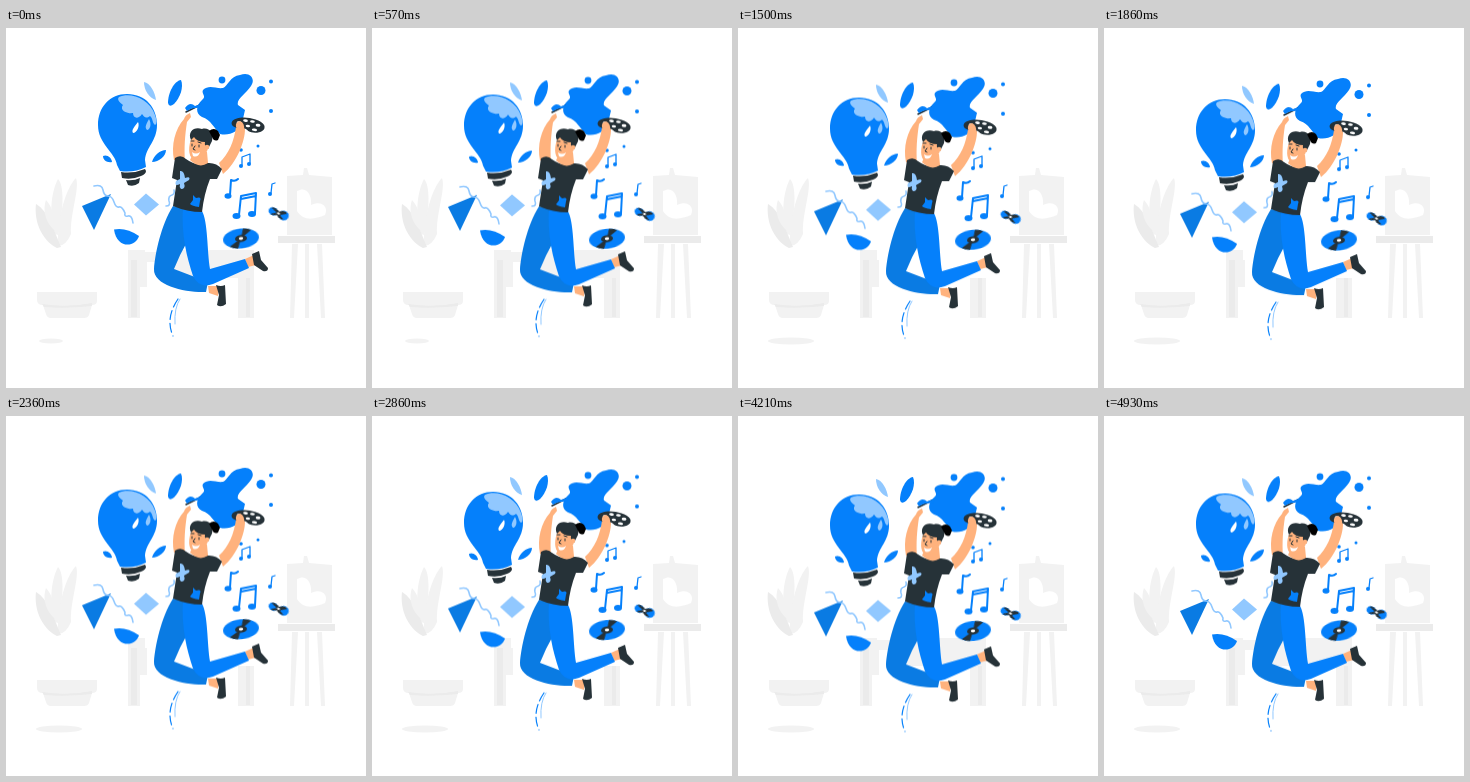
These frames come from a looping animation (360x360 px, 5 s). An HTML page:

```html
<!DOCTYPE html>
<html lang="en">
<head>
<meta charset="utf-8">
<title>Creative jump</title>
<style>
html, body { margin: 0; width: 100%; height: 100%; overflow: hidden; background: #fff; }
svg { display: block; width: 100vw; height: 100vh; }
.b { fill: #0580fb; } .m { fill: #0a7be3; } .l { fill: #91c8ff; } .d { fill: #263238; }
.s { fill: #ffb27d; } .w { fill: #fff; } .g { fill: #f2f2f2; } .h { fill: #ebebeb; }
.line { fill: none; stroke-width: 1.6; stroke-linecap: round; stroke-linejoin: round; }
.lb { stroke: #0580fb; } .ll { stroke: #91c8ff; } .ld { stroke: #263238; }
</style>
</head>
<body>
<svg viewBox="0 0 360 360">
  <g id="room">
    <g class="g">
      <path d="M49 206C42 185 46 162 52 151C58 157 58 180 52 207Z"/>
      <path d="M52 218C51 190 60 160 70 150C74 161 64 185 65 206Q60 218 52 218Z"/>
      <path class="h" d="M51 220C34 211 28 191 30 176C42 183 47 200 55 219Z"/>
      <path d="M47 201C38 192 37 180 40 172C47 180 49 190 49 201Z"/>
      <path d="M31 264H91V273Q91 277 86 277L83 287Q82 290 78 290H45Q41 290 40 286L37 277Q31 277 31 272Z"/>
      <path class="h" d="M36 276Q61 280 86 275V278Q60 281 38 279Z"/>
    </g>
    <ellipse id="shadeShort" class="g" cx="45" cy="313" rx="12" ry="2.5"/>
    <ellipse id="shadeLong" class="g" cx="53" cy="313" rx="23" ry="3.5"/>
    <path id="rail" class="g" d="M139 224H166V234H139ZM168 222H248V250H168Z"/>
    <path class="g" d="M122 222H139V232H141V259H134V290H122ZM232 250H248V290H232Z"/>
    <path class="h" d="M125 232H131V289H125ZM240 250H244V289H240Z"/>
    <path class="g" d="M281 148L297 147L298 140H301L303 147L326 149V207H281Z"/>
    <path class="w" d="M291 163C302 157 306 169 305 177C315 172 323 178 319 187C309 191 298 194 291 183Z"/>
    <path class="h" d="M272 208H329V215H272Z"/>
    <path class="g" d="M286 216H292L288 290H284ZM299 216H303V290H299ZM311 216H316L319 290H315Z"/>
  </g>

  <g data-dy="9.5">
    <path class="b" d="M197 62C203 56 210 61 217 60C222 58 224 48 234 47C244 43 250 51 245 58C240 66 230 71 232 77L239 82L236 95C233 104 223 108 214 106C208 100 205 92 196 89C189 86 190 77 196 72C201 68 195 66 197 62Z"/>
    <g class="b"><circle cx="216" cy="52" r="3.4"/><circle cx="255" cy="62.5" r="4.5"/><circle cx="265" cy="53.5" r="2"/><circle cx="265" cy="83" r="2"/><circle cx="252" cy="118" r="1.5"/><circle cx="235" cy="122" r="1.8"/></g>
  </g>

  <g data-dy="9">
    <path class="b" d="M162 75C162 65 168 53 175 52C178 59 174 70 168 76Q163 80 162 75Z"/>
    <path class="l" d="M138 54C144 55 149 64 150 72C143 70 138 62 138 54Z"/>
  </g>

  <g data-dy="12.5">
    <path class="b" d="M121 66C140 66 151 80 151 97C151 113 140 119 139 132L140 139Q128 145 114 143L111 137C109 124 92 116 92 97C92 79 104 66 121 66Z"/>
    <path class="l" d="M113 69C124 64 143 70 149 87Q152 95 149 97C146 95 147 90 144 88C140 91 138 89 136 86C132 92 127 90 127 85C121 86 113 82 117 77Q110 72 113 69Z"/>
    <path class="w" d="M132 94C134 98 131 105 127 105C125 102 129 98 132 94Z"/>
    <path class="l" d="M143 91C146 96 144 102 141 102C138 99 141 95 143 91Z"/>
    <path class="d" d="M115 144Q127 146 139 141L140 143Q140 146 135 148Q126 152 116 150Z"/>
    <path class="d" d="M120 152Q128 153 134 150L133 155Q128 159 122 157Z"/>
    <path class="b" d="M97 128C101 126 106 130 106 134C101 135 97 132 97 128ZM146 134C148 127 154 122 160 122C160 128 153 134 146 134Z"/>
  </g>

  <g data-dy="18.5">
    <path class="m" d="M105 166L88 202L76 178Z"/>
    <path class="line ll" d="M88 158Q96 156 97 162T102 168T108 174T113 179T119 185Q118 189 122 188T127 195"/>
    <path class="l" d="M140 165.5L153 176.5L140 187.5L128 176.5Z"/>
    <path class="b" d="M108 201.5Q120 199 133 208C130 219 111 222 108 201.5Z"/>
  </g>
  <path class="line ll" data-dy="4" d="M160 178Q165 178 163 173Q162 168 166 167Q169 166 168 162"/>

  <g data-dy="7.5">
    <path class="line lb" style="stroke-width:1.2" stroke-dasharray="9 4" d="M172 271Q159 290 167 308"/>
    <path class="line ll" style="stroke-width:1" d="M174 271Q168 280 169 296"/>
    <g class="line lb">
      <path style="stroke-width:2" d="M233 187L235 168L250 165L249 185M235 171L250 168"/>
      <path style="stroke-width:2" d="M224 167L225 152Q229 154 232 151"/>
      <path d="M236 137V129L244 126V135" style="stroke-width:1.3"/>
      <path d="M265 165L266 156L269 155" style="stroke-width:1.3"/>
    </g>
    <g class="b"><ellipse cx="230.5" cy="188" rx="4" ry="3"/><ellipse cx="246" cy="186" rx="4" ry="3"/><ellipse cx="222" cy="168" rx="3.5" ry="2.8"/><circle cx="235" cy="138" r="2"/><circle cx="243" cy="136" r="2"/><circle cx="264" cy="166" r="2"/></g>
  </g>

  <g data-dy="4.5">
    <g transform="translate(235 210.5) rotate(-6)">
      <ellipse class="b" rx="18" ry="10"/>
      <path class="d" d="M0 0L3 -9.8Q8 -9.5 11 -7.5ZM0 0L-4 9.7Q-9 9 -12 7Z"/>
      <ellipse class="d" rx="6" ry="3.6"/><ellipse class="w" rx="2.2" ry="1.4"/>
    </g>
  </g>
  <g data-dy="12">
    <g transform="translate(272.5 185.5) rotate(22)">
      <ellipse class="b" cx="-5.5" rx="5" ry="4"/>
      <ellipse class="b" cx="5.5" rx="5.2" ry="4.8"/>
      <path class="d" d="M-9 -3Q-5 -5 0 -2Q5 -6 8 -3L2 1L7 4Q2 5 -1 2Q-6 5 -7 3L-2 0Z"/>
      <ellipse class="w" rx="1.6" ry="1"/>
    </g>
  </g>

  <g data-dy="7.4">
    <path class="s" d="M202 258L213 258L212 268L203 265ZM239 231L248 227L250 237L242 239Z"/>
    <path class="d" d="M210 257Q215 259 219 257L220 276Q215 280 211 277L213 267ZM246 226L253 223L255 232L262 240Q262 244 257 243L248 237Z"/>
    <path class="m" d="M167 178L182 181L181 214Q174 226 168 241L202 254L200 264C181 265 147 258 148 241C149 226 155 197 167 178Z"/>
    <path class="b" d="M177 179L196 183C202 194 201 222 204 241L239 231L243 240L207 256Q193 261 187 248C181 230 175 207 177 179Z"/>
    <path class="s" d="M168 132C165 117 169 101 178 91Q179 87 184 85L185 89L181 94C179 107 178 119 179 134Z"/>
    <path class="s" d="M213 135C223 126 228 113 230 99Q235 95 239 101C239 113 231 135 217 146Z"/>
    <path class="d" d="M169 130Q175 126 180 131Q191 139 201 135Q210 134 216 141L211 151L204 151Q198 166 196 184Q181 184 167 178L171 152L166 150Z"/>
    <path class="s" d="M188 124L201 124L202 135Q193 141 184 132Z"/>
    <path class="s" d="M186 109C182 118 182 128 187 131C194 134 202 126 203 116L201 108Z"/>
    <path class="d" d="M185 112C181 103 189 98 196 101C203 99 208 105 206 113L202 121Q198 119 199 114Q191 114 188 109Z"/>
    <path d="M203 103Q208 99 212 103L214 107L212 112Q208 114 206 109Z"/>
    <circle class="s" cx="201" cy="119" r="2.3"/>
    <path class="line ld" style="stroke-width:1" d="M186 116V118M193 117V119M185 113L188 113M192 114L195 115M189 118L187 121L189 122"/>
    <path class="w" d="M186 124Q190 127 194 124Q192 130 187 128Z"/>
    <path class="l" d="M174 143Q178 142 179 150Q185 148 183 152L178 155Q180 161 175 161Q173 159 174 156Q168 159 170 153L174 151Z"/>
    <path class="b" d="M187 167L190 170Q196 168 194 173L193 179Q186 178 184 176L187 172Z"/>
    <path class="line ld" d="M180 84L194 77"/>
    <path class="b" d="M179 80Q184 73 189 78L197 75L195 80Q187 79 181 83Z"/>
    <g transform="translate(242 97) rotate(7)">
      <path class="d" d="M-16 -2C-12 -9 10 -9 16 -2C20 5 7 9 1 6Q-2 3 -7 4C-14 5 -18 2 -16 -2Z"/>
      <g class="w"><ellipse cx="-9" cy="-1" rx="2.5" ry="1.6"/><ellipse cx="-3" cy="-4" rx="2.4" ry="1.3"/><ellipse cx="4" cy="-4" rx="2.4" ry="1.3"/><ellipse cx="10" cy="-1" rx="2.4" ry="1.5"/><ellipse cx="7" cy="4" rx="2.6" ry="1.3"/><ellipse cx="0" cy="1" rx="2.2" ry="1.3"/></g>
    </g>
    <path class="s" d="M230 99Q229 94 234 93Q239 95 238 102L233 104Z"/>
  </g>
</svg>
<script>
const LOOP = 5000;
const LOWEST = 4150;
const play = (el, frames) => el.animate(frames, { duration: LOOP, iterations: Infinity }).startTime = 0;

// Every floating part sinks by its own distance, starts to rise, then snaps back.
for (const el of document.querySelectorAll("[data-dy]")) {
  const sunk = part => `translate(0, ${el.dataset.dy * part}px)`;
  play(el, [
    { transform: sunk(0), easing: "cubic-bezier(.37, 0, .63, 1)" },
    { transform: sunk(1), offset: LOWEST / LOOP, easing: "cubic-bezier(.33, 0, .67, .33)" },
    { transform: sunk(0.9) }
  ]);
}

// Hard on/off changes in the room: [id, [time, opacity], ...]
const switches = [
  ["shadeShort", [0, 1], [1210, 0]],
  ["shadeLong", [0, 0], [1210, 1]],
  ["rail", [0, 1], [1210, 0], [3500, 1]]
];
for (const [id, ...steps] of switches) {
  const frames = steps.map(([t, opacity]) => ({ opacity, offset: t / LOOP, easing: "step-end" }));
  frames.push({ opacity: steps.at(-1)[1], offset: 1 });
  play(document.getElementById(id), frames);
}
</script>
</body>
</html>
```
